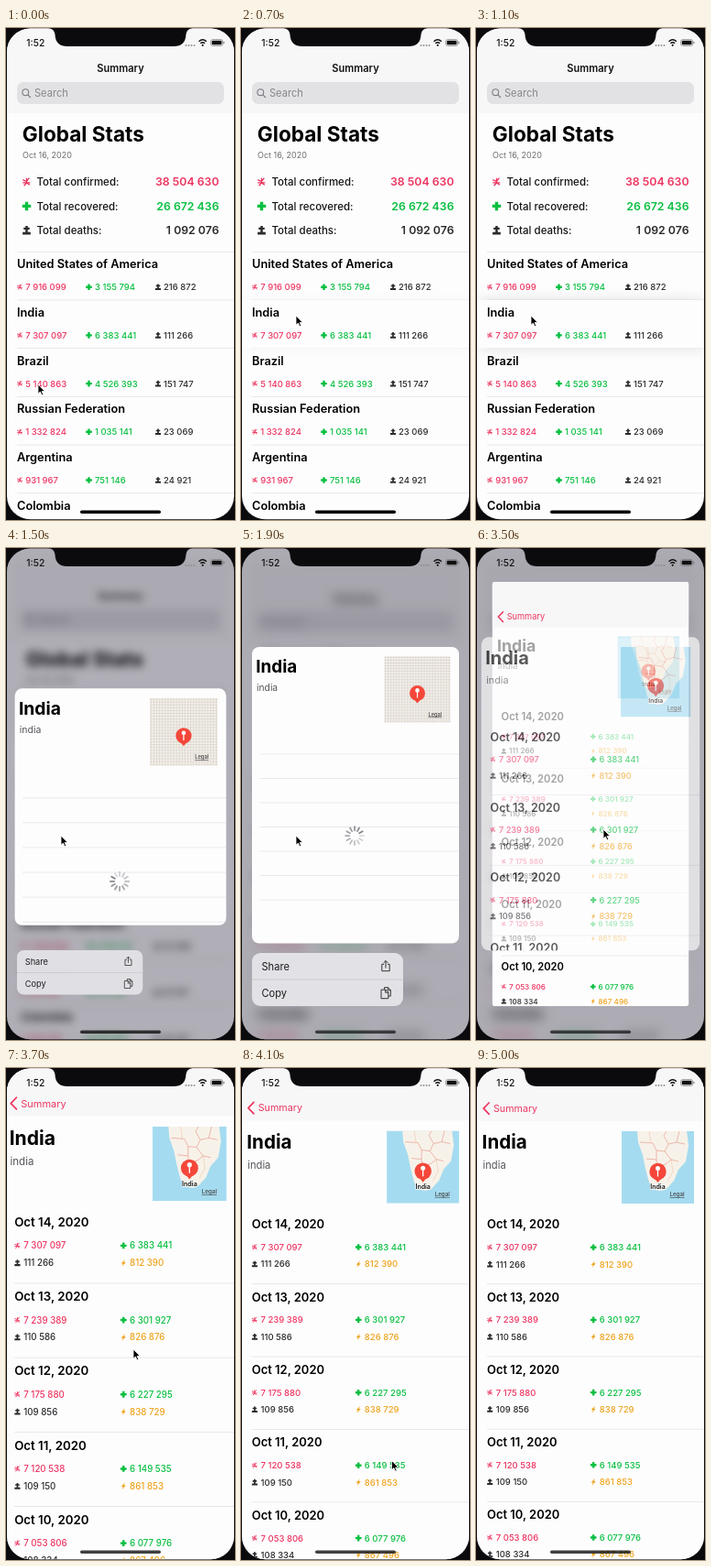
An HTML page that plays this animation: 250x537 px, repeating every 5100 ms.

```html
<!DOCTYPE html>
<html lang="en">
<head>
<meta charset="utf-8">
<title>Summary</title>
<style>
html, body { margin: 0; width: 100%; height: 100%; overflow: hidden; background: #000; }
svg { display: block; }
#stage { width: 100vw; height: 100vh; font-family: Inter, Roboto, sans-serif; }
text { white-space: pre; }
</style>
</head>
<body>
<svg id="stage" viewBox="0 0 250 537"></svg>
<script>
const LOOP = 5100, STEP = 100;
const RED = '#ec3560', GREEN = '#08bf40', DARK = '#2b2b2e', AMBER = '#eda31c', LINE = '#e2e1e6', PAGE = '#fefdfe';

const txt = (s, x, y, size, weight = 400, fill = '#000', anchor = 'start', extra = '') =>
  `<text x="${x}" y="${(y + size * 0.36).toFixed(2)}" font-size="${size}" font-weight="${weight}" fill="${fill}" text-anchor="${anchor}" ${extra}>${s}</text>`;
const rect = (x, y, w, h, fill, r = 0, extra = '') =>
  `<rect x="${x}" y="${y}" width="${w}" height="${h}" rx="${r}" fill="${fill}" ${extra}/>`;
const rule = (x, y, w) => rect(x, y - 0.35, w, 0.8, LINE);
const stroke = (d, color, width, extra = '') =>
  `<path d="${d}" fill="none" stroke="${color}" stroke-width="${width}" ${extra}/>`;

// Icons are drawn in a box from -5 to 5.
const glyphs = {
  ill: stroke('M-4.5 -2.5L0 -.5L3 -4.5M0 -4.5V1L-3 4.5M0 1L3.5 3.5M-4.5 1H4', RED, 1.4),
  well: `<path d="M-1.8 -5H1.8V-1.8H5V1.8H1.8V5H-1.8V1.8H-5V-1.8H-1.8Z" fill="${GREEN}"/>`,
  dead: `<path d="M-1.3 -5H1.3V-3.2H3.4V-.8H1.3V2H4.6V5H-4.6V2H-1.3V-.8H-3.4V-3.2H-1.3Z" fill="${DARK}"/>`,
  active: `<path d="M2.6 -6L-3.8 1.2H-.6L-2.4 6L3.8 -1.2H.6Z" fill="${AMBER}"/>`
};
const tint = { ill: RED, well: GREEN, dead: DARK, active: AMBER };
const icon = (kind, x, y, k) => `<g transform="translate(${x} ${y}) scale(${k})">${glyphs[kind]}</g>`;
const stat = (kind, value, x, y, gap = 6.6) =>
  icon(kind, x, y, 0.66) + txt(value, x + gap, y, 9.5, 500, tint[kind]);

const countries = [
  ['United States of America', '7 916 099', '3 155 794', '216 872'],
  ['India', '7 307 097', '6 383 441', '111 266'],
  ['Brazil', '5 140 863', '4 526 393', '151 747'],
  ['Russian Federation', '1 332 824', '1 035 141', '23 069'],
  ['Argentina', '931 967', '751 146', '24 921'],
  ['Colombia', '930 159', '816 667', '28 457']
];
const days = [
  [14, '7 307 097', '6 383 441', '111 266', '812 390'],
  [13, '7 239 389', '6 301 927', '110 586', '826 876'],
  [12, '7 175 880', '6 227 295', '109 856', '838 729'],
  [11, '7 120 538', '6 149 535', '109 150', '861 853'],
  [10, '7 053 806', '6 077 976', '108 334', '867 496']
];

const countryRow = ([name, ill, well, dead], x, y) =>
  txt(name, x, y + 13.3, 12.8, 600) + stat('ill', ill, x + 3.2, y + 38.5, 6) +
  stat('well', well, x + 78.5, y + 38.5, 6.5) + stat('dead', dead, x + 154, y + 38.5, 6);

function listView() {
  const totals = [['ill', 'confirmed', '38 504 630'], ['well', 'recovered', '26 672 436'], ['dead', 'deaths', '1 092 076']];
  let s = rect(0, 0, 250, 93, '#f7f7f8') + txt('Summary', 125, 44, 11.1, 600, '#111', 'middle') +
    rect(12, 59, 226, 24, '#e2e2e5', 6.5) +
    `<circle cx="21.3" cy="70.2" r="3.4" fill="none" stroke="#7d7d83" stroke-width="1.1"/>` +
    stroke('M23.8 72.8L27 76', '#7d7d83', 1.2) + txt('Search', 31, 71, 11.1, 400, '#85858b') +
    txt('Global Stats', 17.8, 116, 22.6, 700) + txt('Oct 16, 2020', 18, 139, 9, 400, '#6c6c70');
  totals.forEach(([kind, label, n], i) => {
    const y = 168 + i * 26.4;
    s += icon(kind, 22.5, y, 0.95) + txt(`Total ${label}:`, 33.5, y, 11.5, 500, '#151515') +
      txt(n, 232.5, y, 12.3, 600, tint[kind], 'end');
  });
  countries.forEach((c, i) => {
    const y = 244.2 + i * 52.7;
    s += rule(12, y, 238) + countryRow(c, 12, y);
  });
  return s;
}

const pin = `<path d="M35.5 51L39.5 56L43.5 51Z" fill="#f4473a"/><circle cx="39.5" cy="44" r="9.2" fill="#f4473a"/>
  <circle cx="39.5" cy="40.6" r="2.5" fill="#fff"/>` + stroke('M39.5 42V49.5', '#fff', 1.3);
const legal = txt('Legal', 60.5, 69, 6.2, 500, '#444', 'middle', 'text-decoration="underline"');

function gridMap() {
  let d = '';
  for (let i = 1.5; i < 79; i += 3.3) d += `M${i} 0V79M0 ${i}H79`;
  return rect(0, 0, 79, 79, '#f4f1ec') + stroke(d, '#d8d1c8', 0.7) + pin + legal;
}
function landMap() {
  const coast = 'M17 -1L18 12L23 26L26 41L30 56L35 63Q42 67 49 63L57 54L62 42L70 33L73 16L71 -1Z';
  return rect(0, 0, 79, 79, '#a5dbf0') + `<path d="${coast}" fill="#f7f2e9"/>` +
    stroke('M20 12L34 13L38 21L47 22L51 14L60 12L69 14M27 30L38 31V21M38 31L39 44M47 22L54 31L62 33M39 38L48 36L54 31M51 14L46 5L49 0M60 12L63 0', '#eba79c', 0.8) +
    stroke('M30 0L32 13M54 31L56 44L50 55', '#f0c3a8', 0.6) + pin +
    txt('India', 39.5, 60.5, 7, 600, '#111', 'middle', 'stroke="#fff" stroke-width="1.4" paint-order="stroke"') + legal;
}
const mapBox = (body, cls) => `<svg class="${cls}" x="157" y="11" width="79" height="79">${body}</svg>`;

// Detail coordinates start at the panel's top left corner; the panel is 246 wide.
const heading = txt('India', 4.6, 23, 20.6, 700) + txt('india', 5.5, 48, 11.2, 400, '#55555a');
const dayRows = days.map(([d, ill, well, dead, active], i) => {
  const y = 112.7 + i * 79.2;
  return txt(`Oct ${d}, 2020`, 10, y, 12.95, 600) + stat('ill', ill, 13.2, y + 25) + stat('well', well, 126.2, y + 25) +
    stat('dead', dead, 13.2, y + 43.4) + stat('active', active, 126.2, y + 43.4) + (i < 4 ? rule(10, y + 65, 236) : '');
}).join('');

function emptyRows() {
  let s = '';
  for (let i = 0; i < 7; i++) s += rule(9, 127.3 + i * 28.85, 237);
  for (let i = 0; i < 12; i++)
    s += `<rect class="tick" x="-.95" y="-11.8" width="1.9" height="6.4" rx=".9" fill="#6e6e73" transform="translate(122 224.4) rotate(${i * 30})"/>`;
  return s;
}

const shareIcon = stroke('M-2 -2.2H-4.2V5.2H4.2V-2.2H2M0 2V-6M-2.4 -3.6L0 -6L2.4 -3.6', '#222', 0.9);
const copyIcon = stroke('M-1.5 -6H2.5L5.3 -3.2V3.4H3M-1.5 -6V-4M2.3 -6V-3H5.3M-5 -3.6H0L2.8 -.8V6H-5ZM-.3 -3.6V-.5H2.8', '#222', 0.9);
const menuItem = (label, art, y) =>
  txt(label, 10.5, y, 11.1, 400, '#1c1c1e') + `<g transform="translate(146 ${y})">${art}</g>`;

const stage = document.getElementById('stage');
stage.innerHTML = `
<defs>
  <clipPath id="screen"><rect x="1" y=".6" width="248" height="535.6" rx="25.500"/></clipPath>
  <clipPath id="panelClip"><rect class="panel" width="246"/></clipPath>
</defs>
${rect(0, 0, 250, 537, '#0b0b0d')}
<g clip-path="url(#screen)">
  ${rect(0, 0, 250, 537, PAGE)}
  <g id="list">${listView()}</g>
  <rect id="dim" width="250" height="537" fill="#08061a"/>
  <g id="menu">${rect(0, 0, 165, 58, '#e2e1e5', 9)}${rect(0, 28.7, 165, 0.7, '#c4c4c8')}
    ${menuItem('Share', shareIcon, 14.5)}${menuItem('Copy', copyIcon, 43.7)}</g>
  <g id="detail">${rect(0.7, 0, 248.6, 537, PAGE, 3)}${rect(0.7, 0, 248.6, 58, '#f7f7f8', 3)}
    ${stroke('M14.2 38L8.2 44.2L14.2 50.4', RED, 1.7, 'stroke-linecap="round" stroke-linejoin="round"')}
    ${txt('Summary', 19, 44.2, 10.7, 400, RED)}
    <g transform="translate(2 58)">${heading}${mapBox(landMap(), '')}${dayRows}</g></g>
  <g id="pop">
    <rect id="shade" x="0" y="-2" width="246" height="57" fill="#000" style="filter:blur(7px)"/>
    <rect class="panel" width="246" fill="${PAGE}"/>
    <g clip-path="url(#panelClip)">
      <g id="row">${countryRow(countries[1], 10, 0)}</g>
      <g id="preview">${heading}${mapBox(gridMap(), 'grid')}${mapBox(landMap(), 'land')}
        <g id="empty">${emptyRows()}</g><g id="days">${dayRows}</g></g>
    </g>
  </g>
  <rect id="home" x="81" y="526.6" width="88" height="3.4" rx="1.7"/>
</g>
<path d="M46 0Q53 1 53.5 7Q54 20 67 20H183Q196 20 196.500 7Q197 1 204 0Z" fill="#0b0b0d"/>
${txt('1:52', 32.3, 16, 10.3, 500, '#111', 'middle')}
${[196.5, 199.5, 202.5, 205.5].map(x => `<circle cx="${x}" cy="19" r=".9" fill="#8d8d92"/>`).join('')}
${stroke('M210.500 14.700Q214.700 11 218.900 14.700M212.300 16.700Q214.700 14.600 217.100 16.700', '#111', 1.4)}
<circle cx="214.700" cy="18.800" r="1.1" fill="#111"/>
${rect(223.6, 12.6, 13, 6.8, 'none', 2, 'stroke="#77777b" stroke-width=".7"')}
${rect(224.7, 13.7, 10.8, 4.6, '#111', 1.1)}${rect(237.4, 14.8, 1, 2.4, '#77777b', 0.5)}
<path id="cursor" d="M0 0V11.200L2.600 8.800L4.400 12.800L6.200 12L4.500 8.200H8Z" fill="#000" stroke="#fff" stroke-width=".9"/>`;

const el = id => document.getElementById(id);
const all = sel => [...stage.querySelectorAll(sel)];
const panels = all('.panel'), ticks = all('.tick'), [grid] = all('.grid'), [land] = all('.land');
const clamp = v => Math.max(0, Math.min(1, v));
const mix = (a, b, p) => a + (b - a) * p;
const show = (node, on) => { node.style.display = on ? '' : 'none'; };
const place = (node, x, y, k = 1) => node.setAttribute('transform', `translate(${x} ${y}) scale(${k})`);

// Piecewise linear value through [time, value] points.
function along(t, points) {
  if (t <= points[0][0]) return points[0][1];
  for (let i = 1; i < points.length; i++) {
    const [t0, a] = points[i - 1], [t1, b] = points[i];
    if (t <= t1) return mix(a, b, (t - t0) / (t1 - t0));
  }
  return points[points.length - 1][1];
}

function drawPopup(t, p) {
  const fade = along(t, [[3350, 1], [3500, 0.64], [3600, 0.18], [3680, 0]]);
  const open = along(t, [[3300, 0.919], [3400, 0.93], [3500, 0.969], [3600, 1.01]]);
  const leaving = t > 3300;
  const k = leaving ? open : mix(246, 226, p) / 246;
  const h = leaving ? 353 : mix(52.7, 323.5, p) / k;
  const top = leaving ? 268.3 - h * k / 2 : mix(296.9, 108, p);
  show(el('pop'), t >= 700 && fade > 0);
  place(el('pop'), 125 - 123 * k, top, k);
  el('pop').setAttribute('opacity', fade);
  panels.forEach(r => { r.setAttribute('height', h); r.setAttribute('rx', 8.5 * clamp(p * 2)); });
  el('shade').setAttribute('opacity', 0.09 * clamp((t - 600) / 500) * (1 - p));
  el('row').setAttribute('opacity', clamp(1 - p * 2.5));
  el('preview').setAttribute('opacity', clamp(p * 2.5));
  const loaded = t >= 2850;
  show(grid, t < 2200);
  show(land, t >= 2200);
  show(el('empty'), !loaded);
  show(el('days'), loaded);
  const lead = Math.floor(t * 0.012) + 4;
  ticks.forEach((r, i) => r.setAttribute('opacity', 0.25 + 0.6 * (1 - ((lead - i) % 12 + 12) % 12 / 11)));
}

function draw(t) {
  const p = 1 - (1 - clamp((t - 1250) / 490)) ** 2;
  const covered = t >= 3650;

  show(el('list'), !covered);
  const back = mix(1, 0.951, p);
  place(el('list'), 125 * (1 - back), 268 * (1 - back), back);
  el('list').style.filter = p > 0 ? `blur(${(6.5 * p).toFixed(2)}px)` : 'none';
  el('dim').setAttribute('opacity', Math.min(0.33, 0.42 * p));

  const menuFade = along(t, [[1250, 0], [1450, 1], [3300, 1], [3500, 0]]);
  show(el('menu'), menuFade > 0);
  el('menu').setAttribute('opacity', menuFade * mix(0.9, 1, p));
  place(el('menu'), 12, mix(430, 442, p), mix(0.3, 1, p));

  drawPopup(t, p);

  const k = along(t, [[3350, 0.8], [3500, 0.862], [3600, 0.97], [3700, 1.025], [3800, 1.021], [3900, 1.012], [4000, 1.005], [4200, 1]]);
  show(el('detail'), t >= 3400);
  el('detail').setAttribute('opacity', along(t, [[3350, 0], [3480, 1]]));
  place(el('detail'), 125 * (1 - k), 268 * (1 - k), k);
  el('home').setAttribute('opacity', covered ? 0.75 : mix(1, 0.65, p));

  place(el('cursor'),
    along(t, [[0, 35], [600, 60], [1900, 60], [2400, 142], [3100, 142], [3400, 139], [3900, 139], [4300, 190]]),
    along(t, [[0, 389], [600, 314], [1900, 314], [2400, 309], [3100, 309], [3400, 307], [3900, 307], [4300, 550]]), 0.92);
  show(el('cursor'), t < 4300);
}

const start = performance.now();
function tick() {
  const t = (performance.now() - start) % LOOP;
  draw(Math.floor(t / STEP) * STEP);
  requestAnimationFrame(tick);
}
tick();
</script>
</body>
</html>
```
